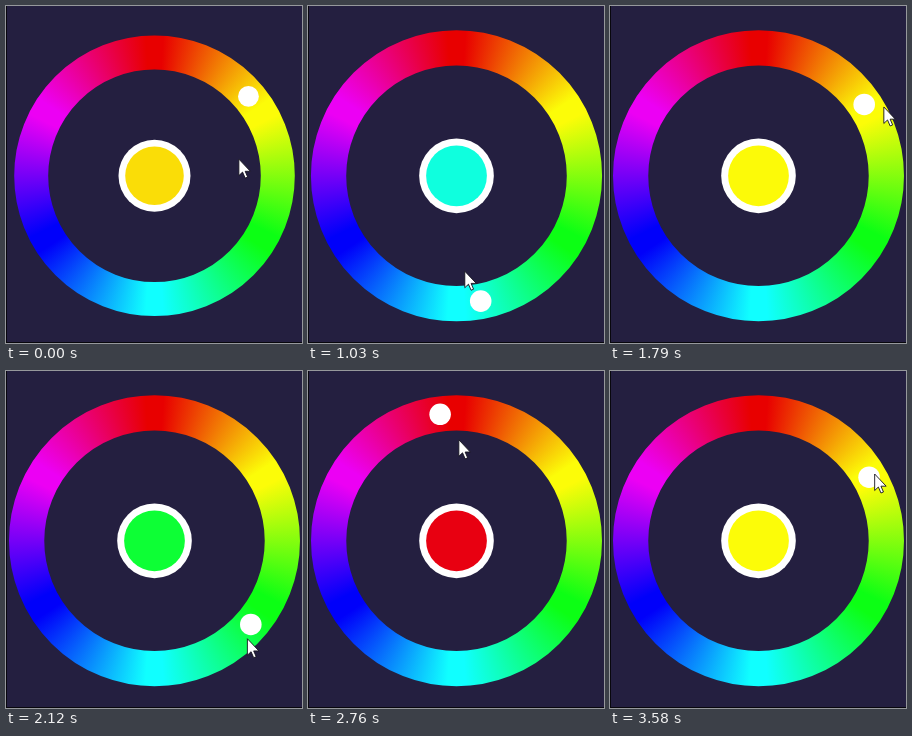
An HTML page with a canvas for the animation above (3.61 s loop, 296 px wide and 337 px high).

```html
<!DOCTYPE html>
<html lang="en">
<head>
<meta charset="utf-8">
<title>Colour wheel</title>
<style>
  html, body { margin: 0; width: 100%; height: 100%; overflow: hidden; background: #241f40; }
  canvas { display: block; }
</style>
</head>
<body>
<canvas id="stage" width="296" height="337"></canvas>
<script>
const ctx = document.getElementById('stage').getContext('2d');
const LOOP = 3610;
const PRESS = 570;
const LEAD = 20;      // ms by which the pointer runs ahead of the knob
const PLATEAU = 0.06; // share of each hue step that stays flat at either end
const X = 148.5;
const Y = 169.8;
const HUES = ['232,0,0', '252,252,8', '12,255,20', '16,255,255', '0,0,250', '236,0,244']
  .map(rgb => rgb.split(',').map(Number));

// The drag: knob angle in degrees, clockwise from the right, and the pointer's reach.
const DRAG = [
  { time: 0, angle: -40.2, reach: 86 },
  { time: PRESS, angle: -40.2, reach: 122 },
  { time: 730, angle: -4.5, reach: 111 },
  { time: 1330, angle: 171, reach: 88 },
  { time: 1790, angle: 325.7, reach: 143 },
  { time: 2120, angle: 400.7, reach: 135 },
  { time: 2760, angle: 622.2, reach: 101 },
  { time: 3580, angle: 1050.1, reach: 134 },
];

const clamp = v => Math.min(1, Math.max(0, v));
const smooth = u => u * u * (3 - 2 * u);
const radians = degrees => degrees * Math.PI / 180;

// Monotone cubic path through the drag points, at rest at both ends.
function follow(key) {
  const slope = i => {
    const a = DRAG[i];
    const b = DRAG[i + 1];
    return a && b ? (b[key] - a[key]) / (b.time - a.time) : 0;
  };
  const tangent = i => {
    const a = slope(i - 1);
    const b = slope(i);
    return a * b > 0 ? 2 * a * b / (a + b) : 0;
  };
  return time => {
    let i = 0;
    while (i < DRAG.length - 2 && time >= DRAG[i + 1].time) i++;
    const span = DRAG[i + 1].time - DRAG[i].time;
    const u = clamp((time - DRAG[i].time) / span);
    const rise = DRAG[i + 1][key] - DRAG[i][key];
    const bend = tangent(i) * (1 - u) - tangent(i + 1) * u;
    return DRAG[i][key] + rise * smooth(u) + span * u * (1 - u) * bend;
  };
}

const knobAngle = follow('angle');
const pointerReach = follow('reach');

// Before the press the pointer swings in from 29 degrees past the knob.
function pointerAngle(time) {
  return knobAngle(time + LEAD) + 29 * (1 - smooth(clamp(time / PRESS)));
}

// Pressing makes the wheel grow like a damped spring.
function wheelScale(time) {
  const s = Math.max(0, time - PRESS) / 1000;
  return 1 + 0.037 * (1 - Math.exp(-9 * s) * Math.cos(20 * s));
}

function polar(degrees, radius) {
  const a = radians(degrees);
  return [X + Math.cos(a) * radius, Y + Math.sin(a) * radius];
}

function hueAt(degrees) {
  const h = ((degrees + 90) % 360 + 360) % 360 / 60;
  const from = HUES[Math.floor(h)];
  const to = HUES[(Math.floor(h) + 1) % 6];
  const mix = clamp((h % 1 - PLATEAU) / (1 - 2 * PLATEAU));
  return `rgb(${from.map((c, i) => Math.round(c + (to[i] - c) * mix))})`;
}

const wheel = ctx.createConicGradient(radians(-90), X, Y);
for (let i = 0; i <= 6; i++) {
  for (const edge of [-PLATEAU, PLATEAU]) {
    wheel.addColorStop(clamp((i + edge) / 6), `rgb(${HUES[i % 6]})`);
  }
}

function disc(x, y, radius, fill) {
  ctx.beginPath();
  ctx.arc(x, y, radius, 0, Math.PI * 2);
  ctx.fillStyle = fill;
  ctx.fill();
}

function drawRing(scale) {
  ctx.beginPath();
  ctx.arc(X, Y, 123.3 * scale, 0, Math.PI * 2);
  ctx.strokeStyle = wheel;
  ctx.lineWidth = 34 * scale;
  ctx.stroke();
}

const arrow = new Path2D('M0 0V16.5L3.7 13L6.3 19L8.8 18L6.3 12.2H11.5Z');

function drawPointer(x, y) {
  ctx.save();
  ctx.translate(x, y);
  ctx.fillStyle = '#fff';
  ctx.fill(arrow);
  ctx.strokeStyle = '#15131f';
  ctx.lineWidth = 0.9;
  ctx.stroke(arrow);
  ctx.restore();
}

function draw(time) {
  const scale = wheelScale(time);
  const angle = knobAngle(time);
  ctx.filter = 'none';
  ctx.fillStyle = '#241f40';
  ctx.fillRect(0, 0, 296, 337);
  ctx.fillStyle = '#08070d';
  ctx.fillRect(0, 0, 1, 337);
  ctx.fillRect(0, 336, 296, 1);

  ctx.filter = 'blur(0.6px)';
  drawRing(scale);
  disc(X, Y, 36 * scale, '#fff');
  disc(X, Y, 29.3 * scale, hueAt(angle));
  disc(...polar(angle, 123 * scale), 10.4 * scale, '#fff');
  ctx.filter = 'none';
  drawPointer(...polar(pointerAngle(time), pointerReach(time)));
}

const start = performance.now();
function tick() {
  draw((performance.now() - start) % LOOP);
  requestAnimationFrame(tick);
}
tick();
</script>
</body>
</html>
```
